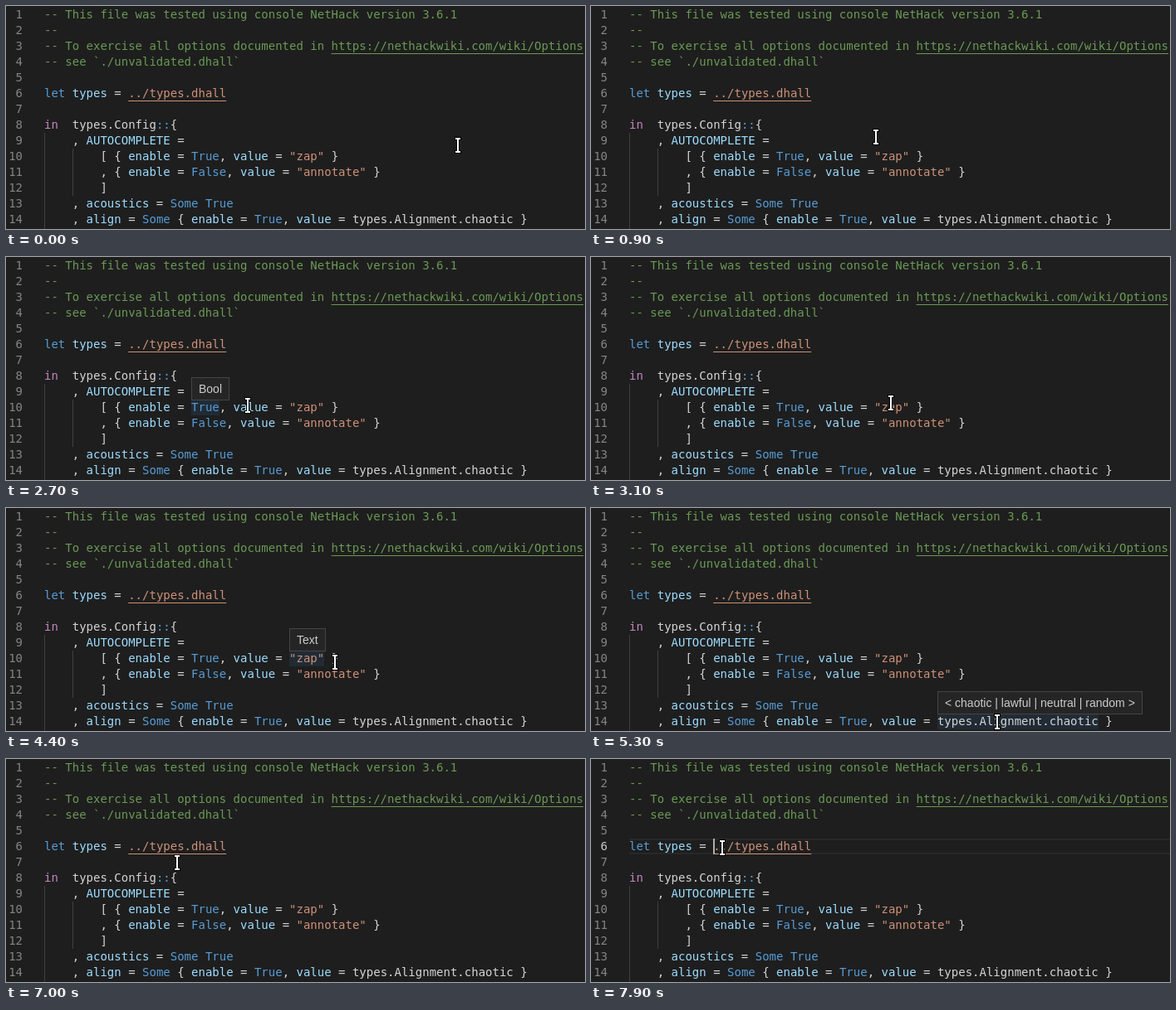
Write an HTML page that moves like this. It is 697 px wide and 269 px high and loops after 8000 ms.

```html
<!DOCTYPE html>
<html lang="en">
<head>
<meta charset="utf-8">
<title>Type hints on hover</title>
<style>
html, body { margin: 0; width: 100%; height: 100%; overflow: hidden; background: #1e1e1e; }
#stage { position: relative; width: 697px; height: 269px; overflow: hidden;
  font: 14px/19px "DejaVu Sans Mono", monospace; color: #d4d4d4; }
#stage > *, .row * { white-space: pre; }
#stage > *, .num, .code { position: absolute; }
.row { left: 0; width: 100%; height: 19px; }
.num { left: 0; width: 20px; text-align: right; color: #858585; }
.code { left: 46px; }
.comment { color: #6a9955; }
.word { color: #569cd6; }
.in { color: #c586c0; }
.name { color: #9cdcfe; }
.text, .path { color: #ce9178; }
.path, .url { text-decoration: underline 1px; text-underline-position: under; }
.guide { width: 1px; background: #404040; }
#line { left: 46px; right: 0; top: 96px; height: 15px; border: solid #282828; border-width: 2px 0; }
#caret { left: 147px; top: 96px; width: 2px; height: 19px; background: #aeafad; }
#mark { height: 19px; background: #264f7840; }
#tip { box-sizing: border-box; height: 28px; padding: 4px 8px; border: 1px solid #454545;
  background: #252526; color: #ccc; font: 14px/18px "Liberation Sans", Arial, sans-serif; }
#beam { left: -10px; top: -12px; }
#beam path { fill: none; stroke-linecap: square; }
</style>
</head>
<body>
<div id="stage">
  <div id="line"></div>
  <div id="mark"></div>
  <div class="guide" style="left:46px;top:153px;height:116px"></div>
  <div class="guide" style="left:80px;top:172px;height:57px"></div>
  <div id="caret"></div>
  <div id="tip"></div>
  <svg id="beam" width="20" height="24" viewBox="-10 -12 20 24">
    <path d="M-2-8h4M0-8V8M-2 8h4" stroke="#000" stroke-width="4"/>
    <path d="M-2-8h4M0-8V8M-2 8h4" stroke="#fff" stroke-width="2"/>
  </svg>
</div>
<script>
const $ = id => document.getElementById(id);
const LOOP = 8000, STEP = 100, CHAR = 14 * 1233 / 2048, LEFT = 46;
const rowTop = n => 1 + 19 * (n - 1);

const lines = `-- This file was tested using console NetHack version 3.6.1
--
-- To exercise all options documented in https://nethackwiki.com/wiki/Options
-- see \`./unvalidated.dhall\`

let types = ../types.dhall

in  types.Config::{
    , AUTOCOMPLETE =
        [ { enable = True, value = "zap" }
        , { enable = False, value = "annotate" }
        ]
    , acoustics = Some True
    , align = Some { enable = True, value = types.Alignment.chaotic }`.split("\n");

const token = /(?<text>"[^"]*")|(?<path>\.\.\/\S+)|(?<word>\b(?:let|True|False|Some)\b|::)|(?<in>\bin\b)|(?<name>\w+(?= =))/g;
const span = (type, s) => `<span class="${type}">${s}</span>`;

function paint(line) {
  if (line.startsWith("--")) return span("comment", line.replace(/https:\S+/, s => span("url", s)));
  return line.replace(token, (s, ...rest) => {
    const groups = rest.at(-1);
    return span(Object.keys(groups).find(k => groups[k]), s);
  });
}

const rows = lines.map((line, i) => {
  const row = document.createElement("div");
  row.className = "row";
  row.style.top = rowTop(i + 1) + "px";
  row.innerHTML = span("num", i + 1) + span("code", paint(line));
  $("stage").insertBefore(row, $("caret"));
  return row;
});

// Each pointer move is a quadratic curve from the previous resting place
const home = [544, 168];
const moves = [
  { from: 400, to: 1500, via: [268, 144], end: [234, 179] },
  { from: 2600, to: 3100, via: [395, 178], end: [361, 176] },
  { from: 4300, to: 4800, via: [453, 197], end: [489, 258] },
  { from: 6400, to: 7300, via: [197, 112], end: [144, 104] },
  { from: 7300, to: 7600, via: [137, 101], end: [150, 107] },
  { from: 7800, to: 7900, via: [154, 107], end: [158, 107] }
];

const hovers = [
  { from: 1800, to: 2800, row: 10, word: "True", type: "Bool" },
  { from: 3500, to: 4500, row: 10, word: '"zap"', type: "Text" },
  { from: 5200, to: 6600, row: 14, word: "types.Alignment.chaotic", type: "< chaotic | lawful | neutral | random >" }
];

function pointer(t) {
  let place = home;
  for (const { from, to, via, end } of moves) {
    if (t < from) break;
    const k = Math.min(1, (t - from) / (to - from));
    place = place.map((p, i) => (1 - k) ** 2 * p + 2 * k * (1 - k) * via[i] + k * k * end[i]);
  }
  return place.map(Math.round);
}

const show = (el, on) => el.style.visibility = on ? "visible" : "hidden";

function draw(now) {
  const t = Math.floor(now % LOOP / STEP) * STEP;
  const [x, y] = pointer(t);
  $("beam").style.transform = `translate(${x}px, ${y}px)`;

  const hover = hovers.find(h => t >= h.from && t < h.to);
  show($("tip"), hover);
  show($("mark"), hover);
  if (hover) {
    const { row, word } = hover;
    const left = Math.round(LEFT + lines[row - 1].indexOf(word) * CHAR), top = rowTop(row);
    Object.assign($("mark").style, { left: left + "px", top: top + "px", width: word.length * CHAR + "px" });
    Object.assign($("tip").style, { left: left + "px", top: top - 27 + "px",
      opacity: t < hover.from + STEP ? 0.5 : 1 });
    $("tip").textContent = hover.type;
  }

  const clicked = t >= 7800;
  show($("line"), clicked);
  show($("caret"), clicked);
  rows[5].firstChild.style.color = clicked ? "#c6c6c6" : "";
}

const start = performance.now();
function tick() {
  draw(performance.now() - start);
  requestAnimationFrame(tick);
}
tick();
</script>
</body>
</html>
```
